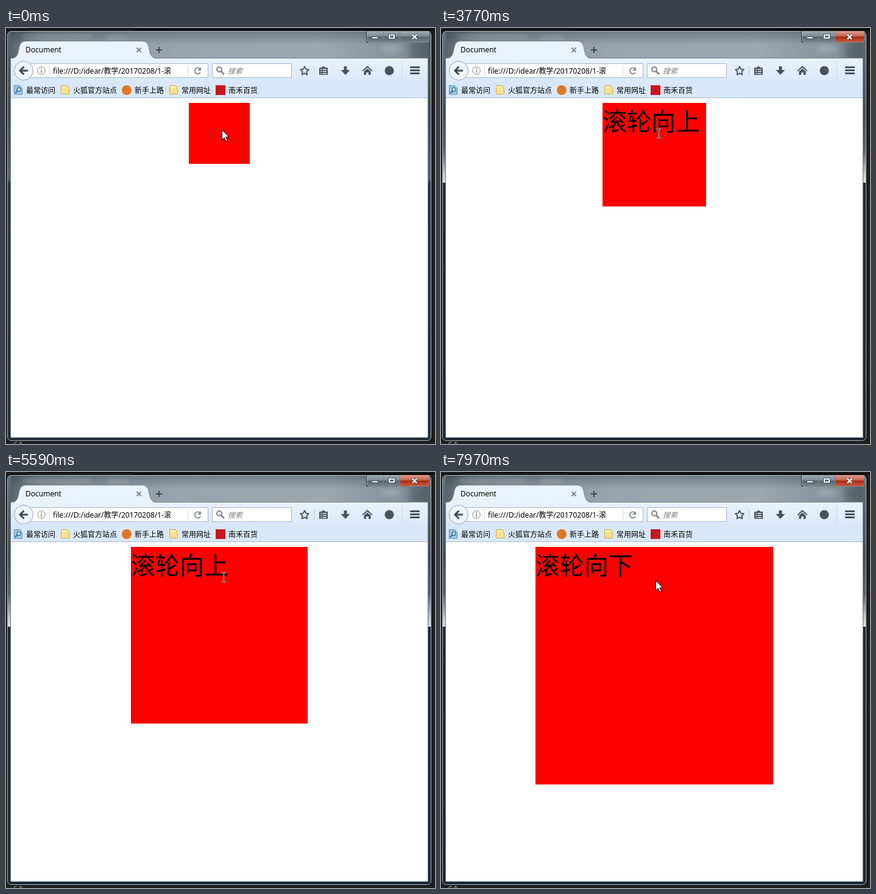
Write an HTML page that moves like this. It is 704 by 683 pixels and loops after 8000 ms.

```html
<!DOCTYPE html>
<html lang="zh-CN">
<head>
<meta charset="utf-8">
<title>Document</title>
<style>
html, body { margin: 0; width: 100%; height: 100%; overflow: hidden; background: #1f1f1f; }
svg { display: block; width: 704px; height: 683px; }
text { font: 12px "Noto Sans", "Noto Sans CJK SC", sans-serif; white-space: pre; }
.big { font: 40px "Noto Sans CJK SC", "Noto Sans CJK", sans-serif; }
.crisp { shape-rendering: crispEdges; }
#beam { mix-blend-mode: difference; }
</style>
</head>
<body>
<svg viewBox="0 0 704 683">
  <defs>
    <linearGradient id="title">
      <stop offset="0" stop-color="#59656d"/><stop offset=".08" stop-color="#84909a"/>
      <stop offset=".4" stop-color="#98a4ae"/><stop offset=".75" stop-color="#9ca7b0"/>
      <stop offset=".94" stop-color="#84919a"/><stop offset="1" stop-color="#59656d"/>
    </linearGradient>
    <linearGradient id="shade" x2="0" y2="1">
      <stop offset="0" stop-color="#28323b" stop-opacity=".35"/><stop offset=".5" stop-color="#28323b" stop-opacity="0"/>
    </linearGradient>
    <linearGradient id="idleSide" x2="0" y2="1">
      <stop offset="0" stop-color="#59646c"/><stop offset=".2" stop-color="#414b54"/>
      <stop offset=".36" stop-color="#59636c"/><stop offset=".37" stop-color="#2c3742"/><stop offset="1" stop-color="#242e39"/>
    </linearGradient>
    <linearGradient id="liveSide" x2="0" y2="1">
      <stop offset="0" stop-color="#64707a"/><stop offset=".2" stop-color="#414d58"/><stop offset=".29" stop-color="#59646f"/>
      <stop offset=".35" stop-color="#c3cad0"/><stop offset=".369" stop-color="#d8dde1"/>
      <stop offset=".37" stop-color="#1f2a36"/><stop offset="1" stop-color="#1d2835"/>
    </linearGradient>
    <linearGradient id="bar" x2="0" y2="1">
      <stop offset="0" stop-color="#e9f2fd"/><stop offset=".6" stop-color="#d9e8f8"/><stop offset="1" stop-color="#d9e8f8"/>
    </linearGradient>
    <linearGradient id="grey" x2="0" y2="1">
      <stop offset="0" stop-color="#a3abb2"/><stop offset=".48" stop-color="#7e8991"/>
      <stop offset=".5" stop-color="#56626b"/><stop offset="1" stop-color="#77838c"/>
    </linearGradient>
    <linearGradient id="red" x2="0" y2="1">
      <stop offset="0" stop-color="#dda091"/><stop offset=".48" stop-color="#c4604c"/>
      <stop offset=".5" stop-color="#a82611"/><stop offset="1" stop-color="#ca5a3c"/>
    </linearGradient>
    <filter id="soft"><feGaussianBlur stdDeviation="4"/></filter>
    <clipPath id="urlClip"><rect x="74" y="59" width="198" height="22"/></clipPath>
    <clipPath id="bottomClip"><rect y="679" width="60" height="4"/></clipPath>
    <g id="folder">
      <path d="M.5 1.5q0-1 1-1h9l2 2v3l1 1v8h-12q-1 0-1-1z" fill="#f8e38e" stroke="#d0ab45"/>
      <path d="M2 2h7v2H2z" fill="#fff6cc"/>
    </g>
  </defs>

  <!-- desktop behind the window -->
  <path d="M35 0H210V2H35zM210 1H704V4H210z" fill="#0b0b0c"/>
  <path d="M0 2H35V4H0z" fill="#101010"/>
  <text x="10" y="682" fill="#92928c" clip-path="url(#bottomClip)" style="font:15px 'Noto Sans Mono',monospace">91</text>
  <path d="M50.5 679v4" stroke="#333"/>

  <!-- window frame -->
  <rect x="1.5" y="4.5" width="697" height="674" rx="7" fill="#080b0e"/>
  <rect id="frame" x="2.5" y="5.5" width="695" height="672" rx="6" stroke="#b2bbc2"/>
  <path d="M8 6H692V50H8z" fill="url(#title)"/>
  <g filter="url(#soft)" opacity=".5">
    <path d="M28 13H140M165 15H200" stroke="#d0d6da" stroke-width="6"/>
    <ellipse cx="632" cy="34" rx="16" ry="6" fill="#b0bcc4"/>
    <path d="M664 24H692V50H664z" fill="#4e5a62"/>
  </g>
  <path d="M8 6H692V50H8z" fill="url(#shade)"/>
  <path d="M7.5 50V672.5H692.5V50" fill="none" stroke="#66727d"/>

  <!-- window buttons -->
  <g class="crisp">
    <path d="M591 5H695V21Q695 24 692 24H594Q591 24 591 21z" fill="#303a42"/>
    <path d="M592 5H619V23H594L592 21zM620 5H646V23H620z" fill="url(#grey)"/>
    <path id="close" d="M647 5H694V21L692 23H647z"/>
    <path d="M592.5 5V21L594.5 23.5H692L694.5 21V5M619.5 5V23M646.5 5V23" fill="none" stroke="#c9d0d5" opacity=".5"/>
  </g>
  <path d="M600.5 14.5h10v3h-10z" fill="#fff" stroke="#454f58"/>
  <path d="M629 11.5h8v5h-8z" fill="none" stroke="#454f58" stroke-width="4"/>
  <path d="M629 11.5h8v5h-8z" fill="none" stroke="#fff" stroke-width="2"/>
  <path d="M667 11l7 7m0-7l-7 7" stroke="#454f58" stroke-width="4"/>
  <path d="M667 11l7 7m0-7l-7 7" stroke="#fff" stroke-width="2.2"/>

  <!-- toolbar and tab -->
  <path d="M8 50H692V115H8z" fill="url(#bar)"/>
  <path d="M8 49.5H692" stroke="#71808d"/>
  <path d="M8 50.5C18 50 19 44 21 35C23 25 25 21.5 34 21.5H222C231 21.5 233 25 235 35C237 44 238 50 248 50.5z" fill="#e9f2fd"/>
  <path d="M8 49.5C18 49 19 44 21 35C23 25 25 21.5 34 21.5H222C231 21.5 233 25 235 35C237 44 238 49 248 49.5" fill="none" stroke="#72818e"/>
  <path d="M8 114.5H692" stroke="#a5b9d0"/>
  <text x="32" y="40">Document</text>
  <path d="M214.5 32.5l7 7m0-7l-7 7" stroke="#7d858d" stroke-width="2"/>
  <path d="M246 36h10M251 31v10" stroke="#3e474f" stroke-width="2"/>

  <path class="crisp" d="M40.5 58.5H331.5V81.5H40.5zM338.5 58.5H468.5V81.5H338.5z" fill="#fff" stroke="#a4b7ce"/>
  <circle cx="29" cy="70" r="15.5" fill="#eff5fc" stroke="#8fa3ba"/>
  <path d="M36 70H24M29.5 63.5L23 70L29.5 76.5" fill="none" stroke="#434c55" stroke-width="3"/>
  <circle cx="58" cy="70" r="6.3" fill="none" stroke="#858585"/>
  <path d="M58 66v2M58 69v5" stroke="#858585" stroke-width="1.5"/>
  <path d="M71.5 61V79M298.5 61V79" stroke="#d2d7dc"/>
  <text x="77" y="75" clip-path="url(#urlClip)">file:///D:/idear/教学/20170208/1-滚</text>
  <path d="M318.5 67A5 5 0 1 0 319 73" fill="none" stroke="#858a8f" stroke-width="1.9"/>
  <path d="M320 64v6h-6z" fill="#858a8f"/>
  <circle cx="350" cy="68" r="4" fill="none" stroke="#7c838a" stroke-width="2"/>
  <path d="M353 71l5 5" stroke="#7c838a" stroke-width="2.5"/>
  <text x="364" y="75" fill="#7b7b7b" font-style="italic" style="font-style:italic">搜索</text>

  <path d="M505.5 62V78" stroke="#b9c8d8"/>
  <path d="M649.5 54V86" stroke="#cbd9e8"/>
  <g fill="#49525b">
    <path d="M490 63.2l2.1 4.5 4.9.6-3.6 3.4.9 4.9-4.3-2.4-4.3 2.4.9-4.9-3.6-3.4 4.9-.6z" fill="none" stroke="#49525b" stroke-width="1.8" stroke-linejoin="round"/>
    <path d="M515 65h3.500q0-2 2.500-2t2.500 2H527q1 0 1 1v10q0 1-1 1H515q-1 0-1-1V66q0-1 1-1z"/>
    <path d="M516 68h2m1.500 0H526M516 71.500h2m1.500 0H526M516 75h2m1.500 0H526" stroke="#e6effa" stroke-width="1.600"/>
    <path d="M554.500 63h5v6h5L557 77l-7.500-8h5z"/>
    <path d="M593 62l8.500 8-1.300 1.300L593 64.800l-7.200 6.500-1.300-1.300zM587.500 71.500L593 66.500l5.500 5V77H595v-4h-4v4H587.500z"/>
    <circle cx="629" cy="70" r="7.500"/>
    <rect x="663" y="63" width="16" height="3" rx="1"/>
    <rect x="663" y="68" width="16" height="3" rx="1"/>
    <rect x="663" y="73" width="16" height="3" rx="1"/>
  </g>

  <!-- bookmarks -->
  <path d="M13.500 94.500h9l4 4v10.500h-13z" fill="#9ccbe8" stroke="#5588ad"/>
  <circle cx="21" cy="101" r="3" fill="#e2f3fc" stroke="#356f9a" stroke-width="1.400"/>
  <path d="M19 103l-4 4" stroke="#356f9a" stroke-width="2"/>
  <use href="#folder" x="90" y="94"/>
  <circle cx="198" cy="102" r="8" fill="#e27622"/>
  <use href="#folder" x="268" y="94"/>
  <rect x="344" y="94" width="16" height="16" fill="#c9151e"/>
  <text x="33" y="107">最常访问</text>
  <text x="110" y="107">火狐官方站点</text>
  <text x="211" y="107">新手上路</text>
  <text x="288" y="107">常用网址</text>
  <text x="365" y="107">南禾百货</text>

  <!-- page -->
  <path d="M8 115H692V672H8z" fill="#fff"/>
  <rect id="box" y="123" fill="#f00"/>
  <text id="line1" class="big" y="168"></text>
  <text id="line2" class="big" y="221"></text>
  <path id="arrow" d="M.5.500V16.500L4.200 13L7 19L9.500 18L6.800 12H11.800z" fill="#fff" stroke="#000"/>
  <path id="beam" class="crisp" d="M-3 -7.500H0M1 -7.500H4M.5 -7V7M-3 7.500H0M1 7.500H4" stroke="#fff" fill="none"/>
</svg>
<script>
const LOOP = 8000, CENTER = 350, EM = 40;
// start time in ms, side of the square
const sizes = [
  [0, 100], [1300, 80], [2230, 90], [2480, 100], [2910, 130], [3340, 140], [3620, 150],
  [3770, 170], [4140, 190], [4570, 210], [4850, 220], [5000, 240], [5310, 260], [5590, 290],
  [5740, 300], [5890, 320], [6010, 330], [6280, 350], [6430, 360], [6580, 380], [6700, 390],
  [7230, 420], [7970, 390]
];
// start time, pointer kind, position
const pointers = [
  [0, 'arrow', 354, 167], [1300, 'beam', 356, 168], [3770, 'beam', 357, 173],
  [5890, 'arrow', 353, 175], [7970, 'arrow', 352, 178]
];
const el = id => document.getElementById(id);
const at = (list, t) => list.findLast(step => step[0] <= t);

function message(t) {
  if (t < 1300) return '';
  return t < 2230 || t >= 7970 ? '滚轮向下' : '滚轮向上';
}

function draw(t) {
  const live = t >= 560;
  el('frame').setAttribute('fill', `url(#${live ? 'liveSide' : 'idleSide'})`);
  el('close').setAttribute('fill', `url(#${live ? 'red' : 'grey'})`);

  const size = at(sizes, t)[1], left = CENTER - size / 2;
  el('box').setAttribute('x', left);
  el('box').setAttribute('width', size);
  el('box').setAttribute('height', size);

  const text = message(t), fit = Math.floor(size / EM);
  [text.slice(0, fit), text.slice(fit)].forEach((part, i) => {
    const line = el('line' + (i + 1));
    line.setAttribute('x', left);
    line.textContent = part;
  });

  const [, kind, x, y] = at(pointers, t);
  for (const id of ['arrow', 'beam']) {
    el(id).setAttribute('visibility', id === kind ? 'visible' : 'hidden');
    el(id).setAttribute('transform', `translate(${x} ${y})`);
  }
}

const start = performance.now();
function tick() {
  draw((performance.now() - start) % LOOP);
  requestAnimationFrame(tick);
}
tick();
</script>
</body>
</html>
```
